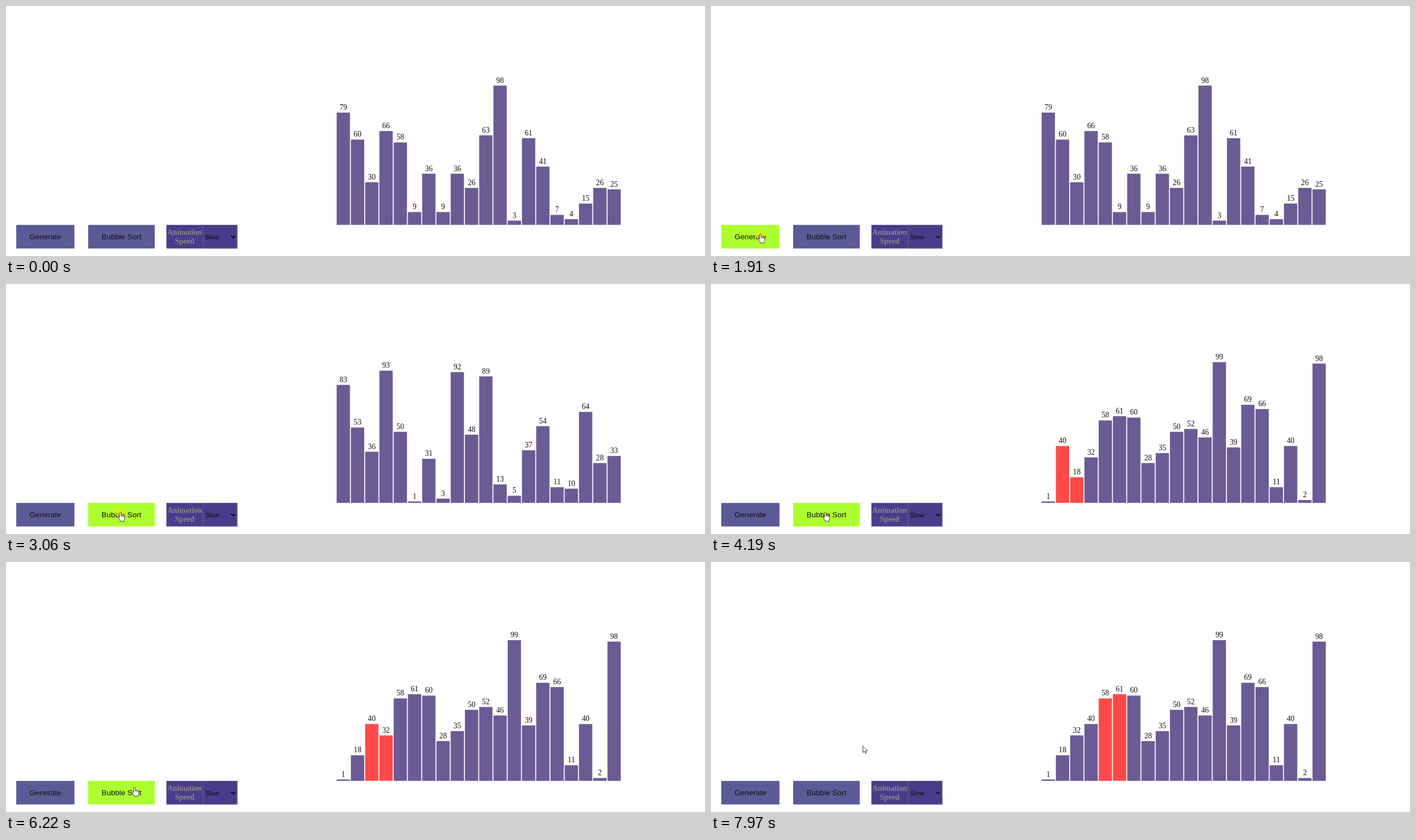
An HTML page with a canvas that plays this animation: 1249x448 px, repeating every 8000 ms.

```html
<!DOCTYPE html>
<html lang="en">
<head>
<meta charset="utf-8">
<title>Bubble sort</title>
<style>
  html, body { margin: 0; width: 100%; height: 100%; overflow: hidden; background: #fff; }
  canvas { display: block; }
</style>
</head>
<body>
<canvas id="stage" width="1249" height="448"></canvas>
<script>
const ctx = document.getElementById('stage').getContext('2d');
const LOOP = 8000;
const SERIF = '"Liberation Serif", "Times New Roman", serif';
const SANS = '"Liberation Sans", Arial, sans-serif';
const PURPLE = '#6b5b95', RED = '#ff4949', LIME = '#adff2f', BUTTON = '#5a5a96';

// Page units are drawn at this zoom.
const ZOOM = 0.849;
const BARS = { x: 590.8, base: 392.2, pitch: 30 * ZOOM, width: 28 * ZOOM, unit: 3 * ZOOM };

const FIRST = [79, 60, 30, 66, 58, 9, 36, 9, 36, 26, 63, 98, 3, 61, 41, 7, 4, 15, 26, 25];
const SECOND = [83, 53, 36, 93, 50, 1, 31, 3, 92, 48, 89, 13, 5, 37, 54, 11, 10, 64, 28, 33];
const SORTED_RUN = [1, 40, 18, 32, 58, 61, 60, 28, 35, 50, 52, 46, 99, 39, 69, 66, 11, 40, 2, 98];

const GENERATE_AT = 2040, SORT_AT = 3140;
const COMPARES = [SORT_AT, 4190, 5390, 6500, 7360];
const SWAPS = [
  { start: 5190, end: 5390, at: 1 },
  { start: 6290, end: 6500, at: 2 }
];
const SWAP_STEPS = [0.43, 0.82, 0.97];

const BUTTONS = [
  { label: 'Generate', x: 18.3, w: 104, },
  { label: 'Bubble Sort', x: 146.8, w: 119 }
];
const ROW = { y: 392.3, h: 42.2 };

const linear = p => p;
const smooth = p => p * p * (3 - 2 * p);
const easeOut = p => 1 - (1 - p) ** 1.5;

// Pointer moves: held samples from start to end, the last one on the goal.
const ENTRY = { x: 890, y: 421 };
const MOVES = [
  { start: 700, end: 910, steps: 4, x: 225, y: 412, ease: linear },
  { start: 1170, end: 1510, steps: 6, x: 88.5, y: 408.5, ease: smooth },
  { start: 2570, end: 2780, steps: 4, x: 204.5, y: 409, ease: smooth },
  { start: 5660, end: 5800, steps: 3, x: 213, y: 414.5, ease: linear },
  { start: 6090, end: 6220, steps: 3, x: 229.5, y: 403.5, ease: linear },
  { start: 6290, end: 6500, steps: 4, x: 264.5, y: 321.5, ease: easeOut },
  { start: 7830, end: 7970, steps: 3, x: 271.5, y: 330, ease: linear }
];
const CLICKS = [
  { start: 1910, end: GENERATE_AT },
  { start: 3060, end: SORT_AT }
];

const ARROW = new Path2D('M0 0V11.6L2.7 9.1L4.5 13.2L6.3 12.4L4.6 8.4H8Z');
const HAND = new Path2D('M-1.4 9.5V1.2Q-1.3 0 0 0T1.4 1.2V5.4Q2.6 4.6 3.6 5.9' +
  'Q5 5.2 5.8 6.5Q7.6 6.2 7.6 8V11.5Q7.5 13.3 6.3 14.5V16.2H-.4V14.7' +
  'L-4 10.2Q-4.5 8.8 -3.4 8.4Q-2.4 8.2 -1.4 9.5Z');

const between = (t, span) => t >= span.start && t < span.end;

function pointerAt(t) {
  if (t < MOVES[0].start) return null;
  let pos = ENTRY;
  for (const move of MOVES) {
    if (t < move.start) break;
    const gap = (move.end - move.start) / (move.steps - 1);
    const step = t >= move.end ? move.steps : 1 + Math.floor((t - move.start) / gap);
    const p = move.ease(step / move.steps);
    pos = { x: pos.x + (move.x - pos.x) * p, y: pos.y + (move.y - pos.y) * p };
  }
  return pos;
}

function text(str, x, y, font, color, align = 'center') {
  ctx.font = font;
  ctx.fillStyle = color;
  ctx.textAlign = align;
  ctx.fillText(str, x, y);
}

function drawBar(value, slot, color) {
  const x = BARS.x + slot * BARS.pitch;
  const h = value * BARS.unit;
  ctx.fillStyle = color;
  ctx.fillRect(x, BARS.base - h, BARS.width, h);
  text(value, x + BARS.width / 2, BARS.base - h - 5, `${16 * ZOOM}px ${SERIF}`, '#111');
}

function drawBars(t) {
  const sorting = t >= SORT_AT;
  const values = (sorting ? SORTED_RUN : t >= GENERATE_AT ? SECOND : FIRST).slice();
  const active = sorting ? COMPARES.filter(at => t >= at).length - 1 : -9;
  const offset = values.map(() => 0);
  for (const swap of SWAPS) {
    const i = swap.at;
    if (t >= swap.end) {
      [values[i], values[i + 1]] = [values[i + 1], values[i]];
    } else if (t >= swap.start) {
      const p = (t - swap.start) / (swap.end - swap.start);
      offset[i] = SWAP_STEPS[Math.floor(p * SWAP_STEPS.length)];
      offset[i + 1] = -offset[i];
    }
  }
  values.forEach((value, i) => {
    const color = i === active || i === active + 1 ? RED : PURPLE;
    drawBar(value, i + offset[i], color);
  });
}

function drawControls(hovered) {
  for (const b of BUTTONS) {
    ctx.fillStyle = b === hovered ? LIME : BUTTON;
    ctx.fillRect(b.x, ROW.y, b.w, ROW.h);
    text(b.label, b.x + b.w / 2, 418, `${16 * ZOOM}px ${SANS}`, '#111');
  }

  ctx.fillStyle = '#483d8b';
  ctx.fillRect(286.6, ROW.y, 126.8, ROW.h);
  ctx.strokeStyle = '#736c7c';
  ctx.lineWidth = 0.85;
  ctx.strokeRect(352.2, ROW.y + 0.4, 60.8, ROW.h - 0.8);

  const bold = `bold ${16 * ZOOM}px ${SERIF}`;
  text('Animation', 319.2, 410.3, bold, '#8f8486');
  text('Speed', 319.2, 425.7, bold, '#8f8486');
  text('Slow', 356.3, 417.6, `${13.33 * ZOOM}px ${SANS}`, '#080808', 'left');

  ctx.strokeStyle = '#080808';
  ctx.lineWidth = 1.7;
  ctx.beginPath();
  ctx.moveTo(402, 411.8);
  ctx.lineTo(405.7, 415.6);
  ctx.lineTo(409.4, 411.8);
  ctx.stroke();
}

function drawPointer(pos, hovered, clicking) {
  if (clicking) {
    ctx.fillStyle = 'rgba(240, 240, 0, 0.55)';
    ctx.beginPath();
    ctx.arc(pos.x - 0.4, pos.y + 0.8, 8.7, 0, 2 * Math.PI);
    ctx.fill();
  }
  const shape = hovered ? HAND : ARROW;
  ctx.save();
  ctx.translate(pos.x, pos.y);
  ctx.fillStyle = '#fff';
  ctx.strokeStyle = '#222';
  ctx.lineWidth = 0.9;
  ctx.lineJoin = 'round';
  ctx.fill(shape);
  ctx.stroke(shape);
  if (hovered) {
    ctx.lineWidth = 0.6;
    ctx.beginPath();
    for (const [x, y] of [[1.4, 5.4], [3.6, 5.9], [5.8, 6.5]]) {
      ctx.moveTo(x, y);
      ctx.lineTo(x, y + 2.8);
    }
    ctx.stroke();
  }
  ctx.restore();
}

function draw(t) {
  ctx.fillStyle = '#fff';
  ctx.fillRect(0, 0, 1249, 448);
  const pos = pointerAt(t);
  const hovered = pos && BUTTONS.find(b =>
    pos.x >= b.x && pos.x <= b.x + b.w && pos.y >= ROW.y && pos.y <= ROW.y + ROW.h);
  drawBars(t);
  drawControls(hovered);
  if (pos) drawPointer(pos, hovered, CLICKS.some(c => between(t, c)));
}

let origin = null;
function tick(now) {
  if (origin === null) origin = now;
  draw((now - origin) % LOOP);
  requestAnimationFrame(tick);
}
draw(0);
requestAnimationFrame(tick);
</script>
</body>
</html>
```
